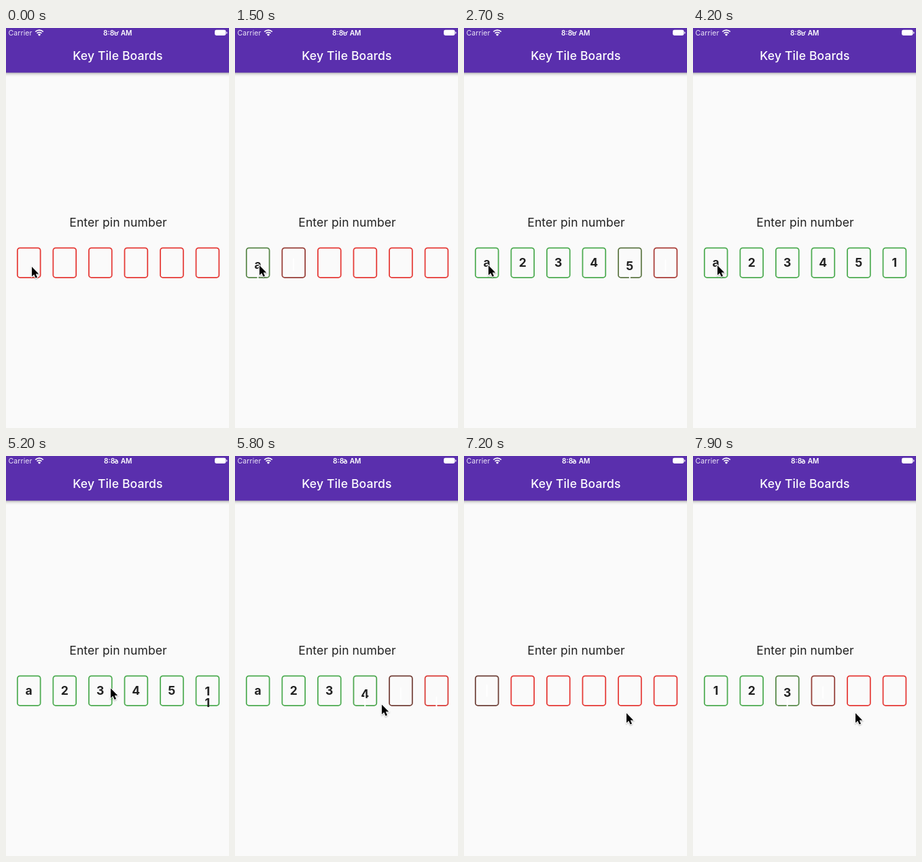
An HTML page with a canvas that plays this animation: 328x588 px, repeating every 8 s.

```html
<!DOCTYPE html>
<html lang="en">
<head>
<meta charset="utf-8">
<title>Pin entry</title>
<style>
  html, body { margin: 0; width: 100%; height: 100%; overflow: hidden; background: #fafafa; }
  canvas { display: block; width: 328px; height: 588px; }
</style>
</head>
<body>
<canvas></canvas>
<script>
const WIDTH = 328, HEIGHT = 588, LOOP = 8000, DURATION = 250;
const CELLS = 6, PITCH = 52.55, SLIDE = 18.5;
const FONT = 'Inter, Roboto, sans-serif';
const PURPLE = '#5a2fad', INK = '#212121';
const EMPTY = [229, 57, 53], SELECTED = [110, 64, 56], FILLED = [76, 171, 80];

// [time, entered text]; null means unfocused, a repeated text retypes its last character
const entries = [
  [-1000, null], [550, ''], [1350, 'a'], [1830, 'a2'], [2080, 'a23'], [2325, 'a234'],
  [2575, 'a2345'], [2870, 'a23451'], [5005, 'a23451'],
  [5400, 'a2345'], [5600, 'a234'], [5770, 'a23'], [5920, 'a2'], [6101, ''], [6102, 'a'],
  [6720, ''], [7330, '1'], [7495, '12'], [7745, '123']
];

// [time, x, y] of the pointer tip
const pointerPath = [
  [0, 38, 351], [100, 38, 351], [200, 36, 349], [4450, 36, 349], [5150, 154, 341.5],
  [5250, 154, 341.5], [6080, 238, 374], [6750, 238, 374], [7150, 239, 378], [LOOP, 239, 378]
];

const canvas = document.querySelector('canvas');
const ctx = canvas.getContext('2d');
const scale = window.devicePixelRatio || 1;
canvas.width = WIDTH * scale;
canvas.height = HEIGHT * scale;

const clamp = v => Math.max(0, Math.min(1, v));
const mix = (a, b, t) => a + (b - a) * t;
const easeOut = t => 1 - (1 - t) ** 2;
const easeInOut = t => t * t * (3 - 2 * t);

function text(value, x, y, size, weight, color, align = 'center', spacing = 0) {
  ctx.font = `${weight} ${size}px ${FONT}`;
  ctx.letterSpacing = spacing + 'px';
  ctx.textAlign = align;
  ctx.fillStyle = color;
  ctx.fillText(value, x, y);
}

function roundRect(x, y, w, h, r) {
  ctx.beginPath();
  ctx.roundRect(x, y, w, h, r);
}

function glyphAt(entry, i) {
  if (entry === null) return '';
  return entry[i] || (i === entry.length ? '|' : '');
}

function borderAt(entry, i) {
  if (entry === null || i > entry.length) return EMPTY;
  return i < entry.length ? FILLED : SELECTED;
}

function track(i, valueAt, now, retypes) {
  let state = { from: null, to: valueAt(null, i), time: -1000 };
  let previous = null;
  for (const [time, entry] of entries) {
    if (time > now) break;
    const next = valueAt(entry, i);
    const retyped = retypes && entry !== null && entry === previous && i === entry.length - 1;
    if (next !== state.to || retyped) state = { from: state.to, to: next, time };
    previous = entry;
  }
  return { ...state, progress: clamp((now - state.time) / DURATION) };
}

function drawGlyph(glyph, x, dy) {
  if (glyph === '|') {
    ctx.fillStyle = '#fff';
    ctx.fillRect(x - 1, 336 + dy, 2, 18);
  } else if (glyph) {
    text(glyph, x, 351.4 + dy, 17.5, 700, INK);
  }
}

function drawCell(i, now) {
  const x = 16.8 + i * PITCH, center = x + 16.8;
  const border = track(i, borderAt, now, false);
  const t = easeInOut(border.progress);
  const color = border.to.map((c, k) => Math.round(mix(border.from ? border.from[k] : c, c, t)));
  ctx.strokeStyle = `rgb(${color})`;
  ctx.lineWidth = 1.75;
  roundRect(x, 323.4, 33.8, 43.4, 3.6);
  ctx.stroke();

  const glyph = track(i, glyphAt, now, true);
  const slide = easeOut(glyph.progress);
  if (glyph.progress < 1) drawGlyph(glyph.from, center, SLIDE * slide);
  drawGlyph(glyph.to, center, SLIDE * (1 - slide));
}

function drawStatusBar(now) {
  const later = now >= 4450;
  text('Carrier', 3.5, 11, 10.5, 400, '#eae4f6', 'left', 0.1);

  ctx.strokeStyle = ctx.fillStyle = '#fff';
  ctx.lineWidth = 1.7;
  for (const r of [5, 8.2]) {
    ctx.beginPath();
    ctx.arc(49, 11.3, r, -Math.PI * 0.75, -Math.PI * 0.25);
    ctx.stroke();
  }
  ctx.beginPath();
  ctx.moveTo(49, 11.8);
  ctx.arc(49, 11.8, 3, -Math.PI * 0.75, -Math.PI * 0.25);
  ctx.fill();

  text('8:8', later ? 144 : 143, 11, 10.2, 600, '#fff', 'left');
  ctx.lineWidth = 1.2;
  ctx.stroke(new Path2D(later
    ? 'M160.5 5.2Q164.8 5.5 164.5 10.4M164 8.2Q160.5 6.8 160.3 9Q160.5 11 164 10.4'
    : 'M159.6 4.5L160.6 10.4Q164 11 164 8.5Q163.6 6.6 160.7 7.4M163.4 7.6L165.6 4.8'));
  text('AM', 185.5, 11, 10.2, 600, '#fff', 'right');

  ctx.fillStyle = '#fff';
  roundRect(307, 2.8, 16.5, 8.2, 2.4);
  ctx.fill();
  roundRect(324.2, 5.4, 1.2, 3, 0.6);
  ctx.fill();
}

function drawAppBar(now) {
  ctx.save();
  ctx.shadowColor = 'rgba(0,0,0,.42)';
  ctx.shadowBlur = 5 * scale;
  ctx.shadowOffsetY = 1.5 * scale;
  ctx.fillStyle = PURPLE;
  ctx.fillRect(-10, -10, WIDTH + 20, 75.6);
  ctx.restore();
  drawStatusBar(now);
  text('Key Tile Boards', 164.5, 47, 17.5, 500, '#fff', 'center', 0.15);
}

function drawPointer(now) {
  const k = pointerPath.findIndex(point => point[0] > now);
  const [t0, x0, y0] = pointerPath[k - 1], [t1, x1, y1] = pointerPath[k];
  const t = easeInOut((now - t0) / (t1 - t0));
  ctx.save();
  ctx.translate(mix(x0, x1, t), mix(y0, y1, t));
  const arrow = new Path2D('M0 0V14.2L3.3 11.2L5.6 16.6L8 15.6L5.7 10.4H10.2Z');
  ctx.shadowColor = 'rgba(0,0,0,.3)';
  ctx.shadowBlur = 2 * scale;
  ctx.shadowOffsetY = scale;
  ctx.strokeStyle = '#fff';
  ctx.lineWidth = 1.8;
  ctx.stroke(arrow);
  ctx.shadowColor = 'transparent';
  ctx.fillStyle = '#000';
  ctx.fill(arrow);
  ctx.restore();
}

const start = performance.now();

function draw() {
  const now = (performance.now() - start) % LOOP;
  ctx.setTransform(scale, 0, 0, scale, 0, 0);
  ctx.fillStyle = '#fafafa';
  ctx.fillRect(0, 0, WIDTH, HEIGHT);
  drawAppBar(now);
  text('Enter pin number', 165, 292, 17.5, 400, INK, 'center', 0.1);
  for (let i = 0; i < CELLS; i++) drawCell(i, now);
  drawPointer(now);
  requestAnimationFrame(draw);
}
draw();
</script>
</body>
</html>
```
